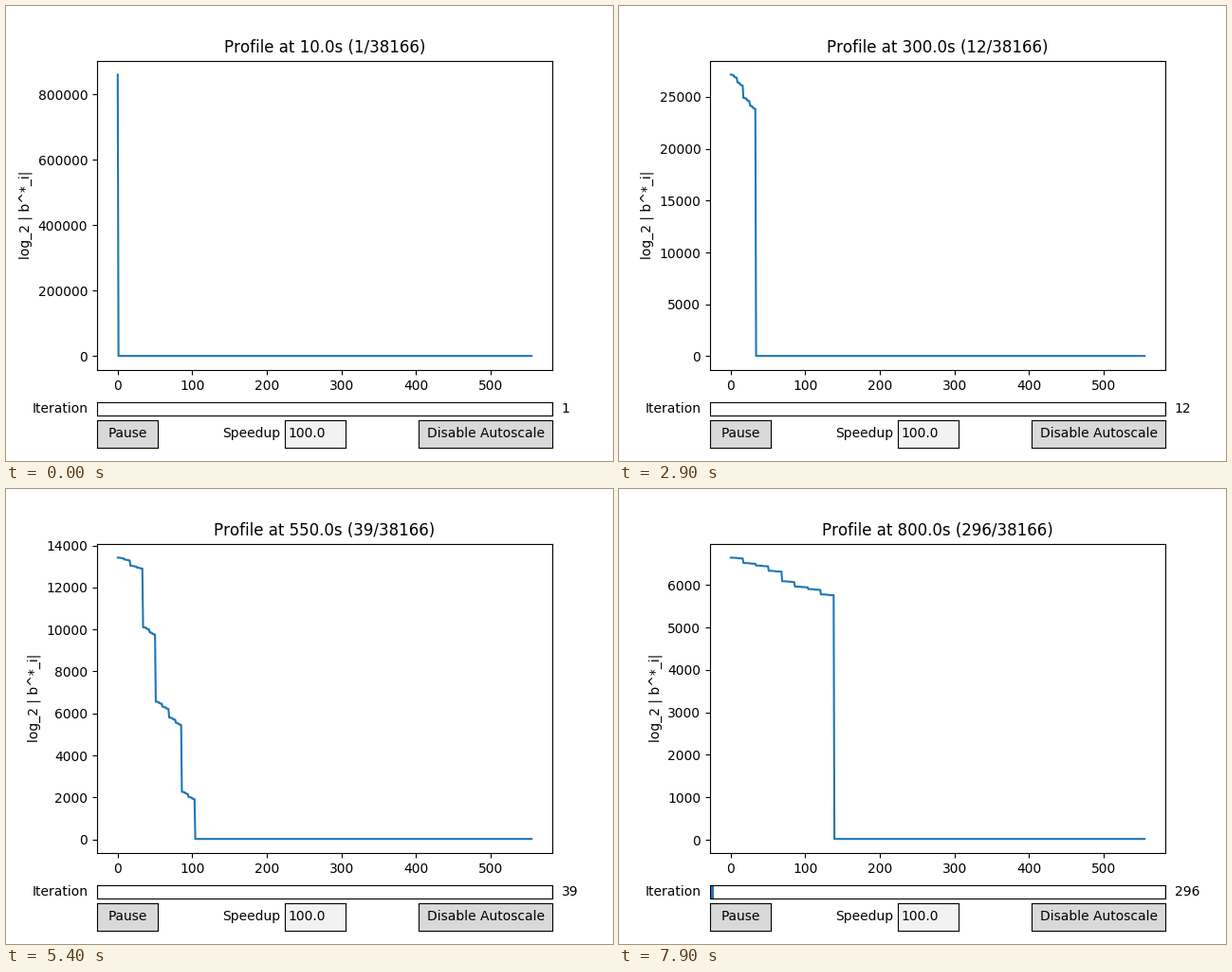
A matplotlib script for the animation above (8 s loop, 640x480 px).

```python
import numpy as np
import matplotlib.pyplot as plt
from matplotlib.animation import FuncAnimation
from matplotlib.patches import Rectangle

plt.rcParams["text.kerning_factor"] = 6

FRAMES, INTERVAL = 80, 100
TOTAL = 38166
SIZE, FLOOR, PEAK = 556, 20, 861000
LEAF = np.array([0.06, 0.2, 0.65])   # share of a block's drop per bisection

# first frame, iteration, groups of merged blocks;
# a group is (blocks, top, drop inside a block, drops per merge level)
STAGES = [
    (0, 1, []),
    (5, 2, []),
    (19, 7, [(1, 54140, 7600, [])]),
    (28, 12, [(2, 27150, 1150, [2250])]),
    (35, 13, [(3, 27150, 1200, [7730, 19990])]),
    (40, 30, [(4, 13660, 140, [885, 1270])]),
    (54, 39, [(2, 13417, 140, [387]), (4, 10100, 380, [3540, 4300])]),
    (62, 108, [(8, 9510, 110, [640, 1120, 4643])]),
    (68, 296, [(8, 6645, 20, [125, 185, 555])]),
]


def cuts(a, b, depth):
    """Block starts found by repeated halving of [a, b)."""
    if depth == 0:
        return [a]
    mid = (a + b) // 2
    return cuts(a, mid, depth - 1) + cuts(mid, b, depth - 1)


STARTS = cuts(0, SIZE // 4, 3) + [SIZE // 4]


def profile(groups):
    """Binary staircase: each set bit of the position lowers the curve."""
    y = np.full(SIZE, float(FLOOR))
    if not groups:
        y[0] = PEAK
    first = 0
    for blocks, top, inner, merges in groups:
        drops = [*(inner * LEAF), *merges]
        for k in range(blocks):
            a, b = STARTS[first + k], STARTS[first + k + 1]
            pos = 8 * k + 8 * np.arange(b - a) // (b - a)
            y[a:b] = top - sum((pos >> j & 1) * d for j, d in enumerate(drops))
        first += blocks
    return y


def panel(rect, color="white"):
    box = fig.add_axes(rect, facecolor=color)
    box.set(xticks=[], yticks=[], xlim=(0, 1), ylim=(0, 1))
    return box


def label(box, x, text, ha):
    return box.text(x, 0.5, text, ha=ha, va="center",
                    transform=box.transAxes)


fig = plt.figure(figsize=(6.4, 4.8), dpi=100)
ax = fig.add_axes([0.15, 0.2, 0.75, 0.68])
line, = ax.plot(np.arange(SIZE), profile([]))
ax.set_ylabel("log_2 | b^*_i|")

slider = panel([0.15, 0.1, 0.75, 0.03])
bar = slider.add_patch(Rectangle((0, 0), 0, 1, facecolor="C0", linewidth=0))
slider.axvline(1, color="r", lw=1)
label(slider, -0.02, "Iteration", "right")
count = label(slider, 1.02, "1", "left")

label(panel([0.15, 0.03, 0.1, 0.06], "0.85"), 0.5, "Pause", "center")
label(panel([0.68, 0.03, 0.22, 0.06], "0.85"), 0.5, "Disable Autoscale",
      "center")
speed = panel([0.46, 0.03, 0.1, 0.06], "0.95")
label(speed, -0.08, "Speedup", "right")
label(speed, 0.05, "100.0", "left")


def update(i):
    _, step, groups = [s for s in STAGES if s[0] <= i][-1]
    y = profile(groups)
    pad = 0.05 * (y.max() - y.min())
    line.set_ydata(y)
    ax.set_ylim(y.min() - pad, y.max() + pad)
    ax.set_title(f"Profile at {10 * (i + 1):.1f}s ({step}/{TOTAL})")
    bar.set_width(step / TOTAL)
    count.set_text(str(step))
    return line, bar, count


anim = FuncAnimation(fig, update, frames=FRAMES, interval=INTERVAL,
                     init_func=lambda: update(0), repeat=True,
                     repeat_delay=0, blit=False)
plt.show()
```
